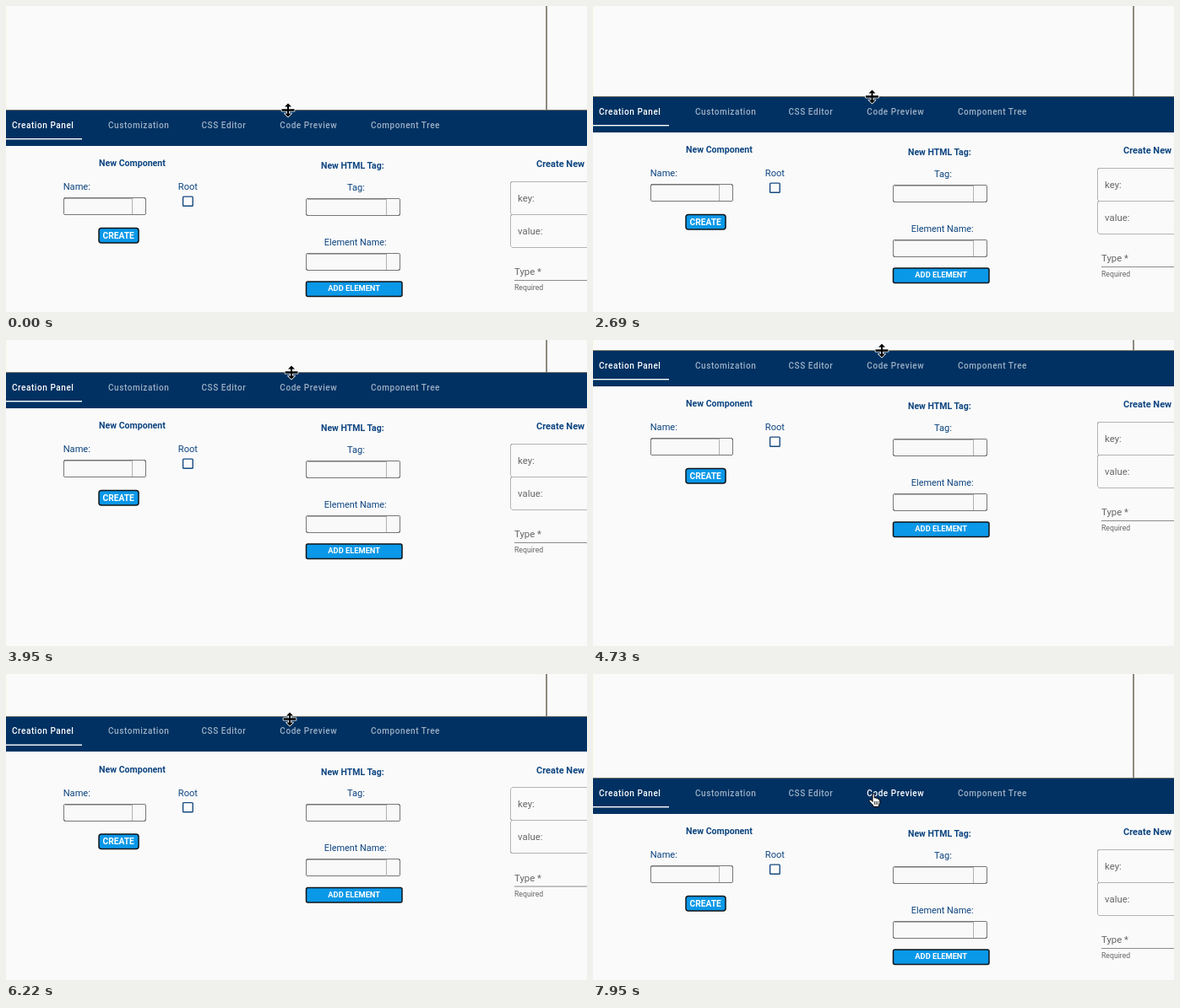
Write an HTML page that moves like this. It is 688 px wide and 363 px high and loops after 8 s.

```html
<!DOCTYPE html>
<html lang="en">
<head>
<meta charset="utf-8">
<title>Resizable panel</title>
<style>
  html, body { margin: 0; width: 100%; height: 100%; overflow: hidden; background: #fafafa; }
  svg { display: block; width: 688px; height: 363px; font-family: Roboto, sans-serif; }
  .tab { font-size: 10px; font-weight: 500; letter-spacing: .56px; fill: #9db0c5; }
  .active { fill: #fff; }
  .title { font-weight: 700; fill: #0d4580; }
  .label { font-size: 11.1px; fill: #0d4580; }
  .hint { font-size: 11.4px; fill: #666; }
  .button { fill: #0a98e8; stroke: #101418; stroke-width: 1.5; }
  .caption { font-weight: 700; fill: #fff; text-anchor: middle; }
  .outline { fill: none; stroke: #b4b4b4; }
  .field { fill: #f9f9f9; stroke: #777; }
  .inner { fill: none; stroke: #b0b0b0; }
  .bar, .field, .inner, .outline { shape-rendering: crispEdges; }
</style>
</head>
<body>
<svg viewBox="0 0 688 363">
  <rect width="688" height="363" fill="#fafafa"/>
  <rect width="1" height="363" fill="#fbfbe8"/>
  <rect x="639.3" width="1.5" height="363" fill="#6c6557"/>

  <g id="panel">
    <rect class="bar" y="123.2" width="688" height="400" fill="#fafafa"/>
    <rect class="bar" y="123.2" width="688" height="1" fill="#6d6d68"/>
    <rect class="bar" y="124.2" width="688" height="41.6" fill="#003162"/>
    <text class="tab active" x="7" y="144.8">Creation Panel</text>
    <text class="tab" x="121" y="144.8">Customization</text>
    <text class="tab" x="231.5" y="144.8">CSS Editor</text>
    <text class="tab" id="preview" x="324.3" y="144.8">Code Preview</text>
    <text class="tab" x="432" y="144.8">Component Tree</text>
    <rect y="157" width="90" height="1.4" fill="#fff"/>

    <text class="title" x="110" y="190.2" font-size="10.6">New Component</text>
    <text class="label" x="67.7" y="218.2">Name:</text>
    <text class="label" x="203.8" y="218.2">Root</text>
    <rect class="field" x="68.5" y="227.7" width="97" height="20" rx="2"/>
    <path class="inner" d="M70 228.7H149.5V247"/>
    <rect x="209.6" y="226.1" width="11.6" height="11.2" rx=".8" fill="none" stroke="#174a80" stroke-width="1.4"/>
    <rect class="button" x="110" y="263.5" width="47" height="17.5" rx="3"/>
    <text class="caption" x="133.2" y="275.8" font-size="10.2">CREATE</text>

    <text class="title" x="373" y="193.2" font-size="10.5">New HTML Tag:</text>
    <text class="label" x="404" y="218.8">Tag:</text>
    <rect class="field" x="355.5" y="228.3" width="111" height="20" rx="2"/>
    <path class="inner" d="M357 229.3H450.5V248"/>
    <text class="label" x="376.8" y="283.8" style="font-size:10.9px">Element Name:</text>
    <rect class="field" x="355.5" y="293.3" width="111" height="20" rx="2"/>
    <path class="inner" d="M357 294.3H450.5V313"/>
    <rect class="button" x="355.5" y="327" width="113.5" height="17.5" rx="2"/>
    <text class="caption" x="412.2" y="338.2" font-size="9.3">ADD ELEMENT</text>

    <text class="title" x="628" y="191.2" font-size="11">Create New</text>
    <rect class="outline" x="597.5" y="208.3" width="110" height="39" rx="3"/>
    <rect class="outline" x="597.5" y="247.3" width="110" height="39" rx="3"/>
    <text class="hint" x="606" y="231.8">key:</text>
    <text class="hint" x="606" y="270.8">value:</text>
    <text class="hint" x="602" y="319.2">Type *</text>
    <path d="M602 325.5H688" stroke="#8c8c8c"/>
    <text class="hint" x="602" y="337.2" style="font-size:8.7px">Required</text>
  </g>

  <path id="resize" fill="#000" stroke="#fff" stroke-width="1.6" stroke-linejoin="round" paint-order="stroke"
    d="M0-8L4-4H1V-1.3H7.5V1.3H1V4H4L0 8L-4 4H-1V1.3H-7.5V-1.3H-1V-4H-4Z"/>
  <g id="hand" transform="translate(326 141)" fill="#fff" stroke="#000" stroke-linejoin="round" stroke-linecap="round">
    <path d="M5 10V2Q5 .6 6.2.7Q7.3.8 7.3 2V6Q8.7 5.3 9.6 6.6Q11 6 11.8 7.4Q13.6 7.1 13.7 9V11.5Q13.6 13 12.5 14.5V16.5H5.8V15Q3.5 12.5 1.2 9.8Q.5 8.5 1.7 8.1Q2.8 7.8 5 10Z"/>
    <path d="M7.3 10.3V13.5M9.3 10.3V13.5M11.3 10.3V13.5" stroke-width=".8"/>
  </g>
</svg>
<script>
const LOOP = 8000, STEP = 59.7;

// time, cursor x, cursor y, panel top
const KEYS = [
  [0, 334, 123, 123], [60, 332, 123, 123], [120, 328, 123, 123], [2030, 328, 123, 123],
  [2810, 331, 103, 103], [3290, 332, 80, 81], [3650, 335, 56, 56], [3950, 338, 38, 38],
  [4490, 341, 19, 19], [4730, 342, 12, 12], [5090, 342, 5, 5], [5330, 342, 5, 5],
  [6160, 336, 49, 46], [6220, 336, 53, 49.5], [6990, 332, 116, 112], [7170, 331, 127, 123],
  [7710, 330, 142, 123], [LOOP, 330, 142, 123]
];
const $ = id => document.getElementById(id);
const [panel, resize, hand, preview] = ['panel', 'resize', 'hand', 'preview'].map($);

const rate = (i, c) => (KEYS[i + 1][c] - KEYS[i][c]) / (KEYS[i + 1][0] - KEYS[i][0]);

// Harmonic mean keeps the curve monotone between keys
function slope(i, c) {
  if (i === 0 || i === KEYS.length - 1) return 0;
  const a = rate(i - 1, c), b = rate(i, c);
  return a * b > 0 ? 2 * a * b / (a + b) : 0;
}

// Value of one column at a time, to the nearest half pixel
function valueAt(t, c) {
  let i = 0;
  while (i < KEYS.length - 2 && KEYS[i + 1][0] <= t) i++;
  const span = KEYS[i + 1][0] - KEYS[i][0];
  const u = Math.min(1, (t - KEYS[i][0]) / span), v = 1 - u;
  const value =
    KEYS[i][c] * (1 + 2 * u) * v * v + KEYS[i + 1][c] * u * u * (3 - 2 * u) +
    span * u * v * (slope(i, c) * v - slope(i + 1, c) * u);
  return Math.round(value * 2) / 2;
}

function draw(time) {
  const n = Math.floor(time % LOOP / STEP);
  const t = n ? n * STEP + 8 : 0;
  const hovering = t >= 7940;
  panel.setAttribute('transform', `translate(0 ${valueAt(t, 3) - 123})`);
  resize.setAttribute('transform', `translate(${valueAt(t, 1)} ${valueAt(t, 2) + .5})`);
  resize.style.display = hovering ? 'none' : '';
  hand.style.display = hovering ? '' : 'none';
  preview.classList.toggle('active', hovering);
}

const start = performance.now();
function tick() {
  draw(performance.now() - start);
  requestAnimationFrame(tick);
}
tick();
</script>
</body>
</html>
```
